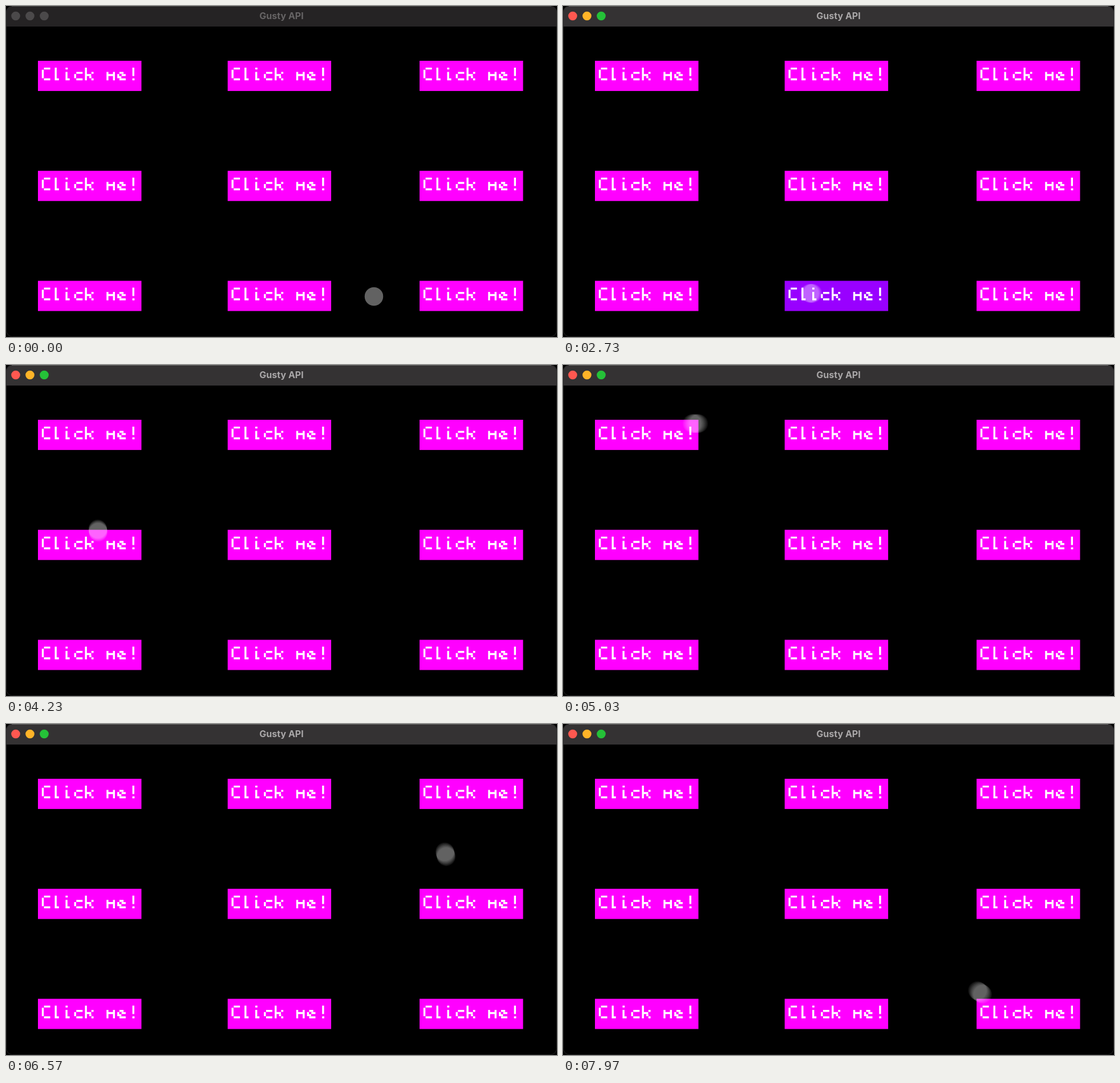
An HTML page with a canvas that plays this animation: 966x580 px, repeating every 8 s.

```html
<!DOCTYPE html>
<html lang="en">
<head>
<meta charset="utf-8">
<title>Buttons</title>
<style>
  html, body { margin: 0; width: 100%; height: 100%; overflow: hidden; background: #000; }
  canvas { display: block; }
</style>
</head>
<body>
<canvas id="stage" width="966" height="580"></canvas>
<script>
const ctx = document.getElementById('stage').getContext('2d');
const WIDTH = 966, HEIGHT = 580, BAR = 36;
const LOOP = 8000, FOCUS_TIME = 400;
const PX = 3.78, LEFT = -0.7, TOP = 35.5;  // the game's coarse pixel grid
const BUTTON_W = 48, BUTTON_H = 14;

// Blocky letters as strokes on the coarse grid.
const STROKES = {
  C: 'M3 0H1M0 1V4M1 5H3',
  l: 'M1 0V5H2',
  i: 'M1 0h.1M1 2V5H2',
  c: 'M3 2H1M0 3V4M1 5H3',
  k: 'M0 0V5M0 3H2M3 2h.1M2 4h.1M3 5h.1',
  m: 'M0 2V5M3 2V5M0 3H3',
  e: 'M1 2H2M0 3V4H1M2 3H3M1 5H3',
  '!': 'M2 0V3M2 5h.1'
};
const label = new Path2D();
[...'Click me!'].forEach((char, i) => {
  label.addPath(new Path2D(STROKES[char] || ''), new DOMMatrix().translate(i * 5, 0));
});

// The pointer rests at each stop, then glides to the next at a steady rhythm.
const STOPS = [
  [645, 509], [456, 503], [173, 509], [165, 318], [136, 102],
  [454, 104], [738, 114], [801, 335], [801, 520], [549, 341]
];
const FIRST_MOVE = 1919, PERIOD = 737, GLIDE = 450;

function pointerAt(t) {
  const elapsed = Math.max(0, t - FIRST_MOVE);
  const leg = Math.min(STOPS.length - 2, Math.floor(elapsed / PERIOD));
  const u = Math.min(1, (elapsed - leg * PERIOD) / GLIDE);
  const ease = u * u * (3 - 2 * u);
  return STOPS[leg].map((from, axis) => from + (STOPS[leg + 1][axis] - from) * ease);
}

function disc(x, y, radius, color) {
  ctx.fillStyle = color;
  ctx.beginPath();
  ctx.arc(x, y, radius, 0, Math.PI * 2);
  ctx.fill();
}

function drawButton(column, row, [mouseX, mouseY]) {
  const x = LEFT + column * PX, y = TOP + row * PX;
  const w = BUTTON_W * PX, h = BUTTON_H * PX;
  const hover = mouseX >= x && mouseX <= x + w && mouseY >= y && mouseY <= y + h;
  ctx.fillStyle = hover ? '#9900ff' : '#ff00ff';
  ctx.fillRect(x, y, w, h);

  ctx.save();
  ctx.translate(x + 2.25 * PX, y + 3.6 * PX);
  ctx.scale(PX, PX);
  ctx.lineWidth = 0.9;
  ctx.lineCap = 'square';
  ctx.strokeStyle = '#fff';
  ctx.stroke(label);
  ctx.restore();
}

function drawWindow(active) {
  ctx.fillStyle = '#000';
  ctx.fillRect(0, 0, WIDTH, HEIGHT);
  ctx.save();
  ctx.beginPath();
  ctx.roundRect(0, 0, WIDTH, HEIGHT, 11);
  ctx.clip();
  ctx.fillStyle = active ? '#343233' : '#252324';
  ctx.fillRect(0, 0, WIDTH, BAR);
  ctx.restore();

  ctx.lineWidth = 1;
  ctx.strokeStyle = '#242424';
  ctx.beginPath();
  ctx.roundRect(0.5, 0.5, WIDTH - 1, HEIGHT - 1, 11);
  ctx.stroke();
  ctx.fillStyle = active ? '#666' : '#4c4c4c';
  ctx.fillRect(10, 0, WIDTH - 20, 1);

  ['#ff5850', '#ffb428', '#25c138'].forEach((color, i) => {
    disc(17 + i * 25, 17.5, 7.8, active ? color : '#4b494a');
  });
  ctx.fillStyle = active ? '#a9a7a8' : '#666465';
  ctx.font = '700 16px Inter, sans-serif';
  ctx.textAlign = 'center';
  ctx.fillText('Gusty API', WIDTH / 2, 22.5);
}

// Overlaid translucent copies give the pointer its motion blur.
function drawPointer(t) {
  const samples = 8, shutter = 12;
  for (let i = 0; i < samples; i++) {
    const [x, y] = pointerAt(t + (i / (samples - 1) - 0.5) * shutter);
    disc(x, y, 16.3, 'rgba(255,255,255,0.058)');
  }
}

const start = performance.now();
function draw() {
  const t = (performance.now() - start) % LOOP;
  const mouse = pointerAt(t + 60);         // the visible pointer trails the mouse
  drawWindow(t >= FOCUS_TIME);
  for (const row of [16, 67, 118]) {
    for (const column of [15, 103, 192]) drawButton(column, row, mouse);
  }
  drawPointer(t);
  requestAnimationFrame(draw);
}
draw();
</script>
</body>
</html>
```
